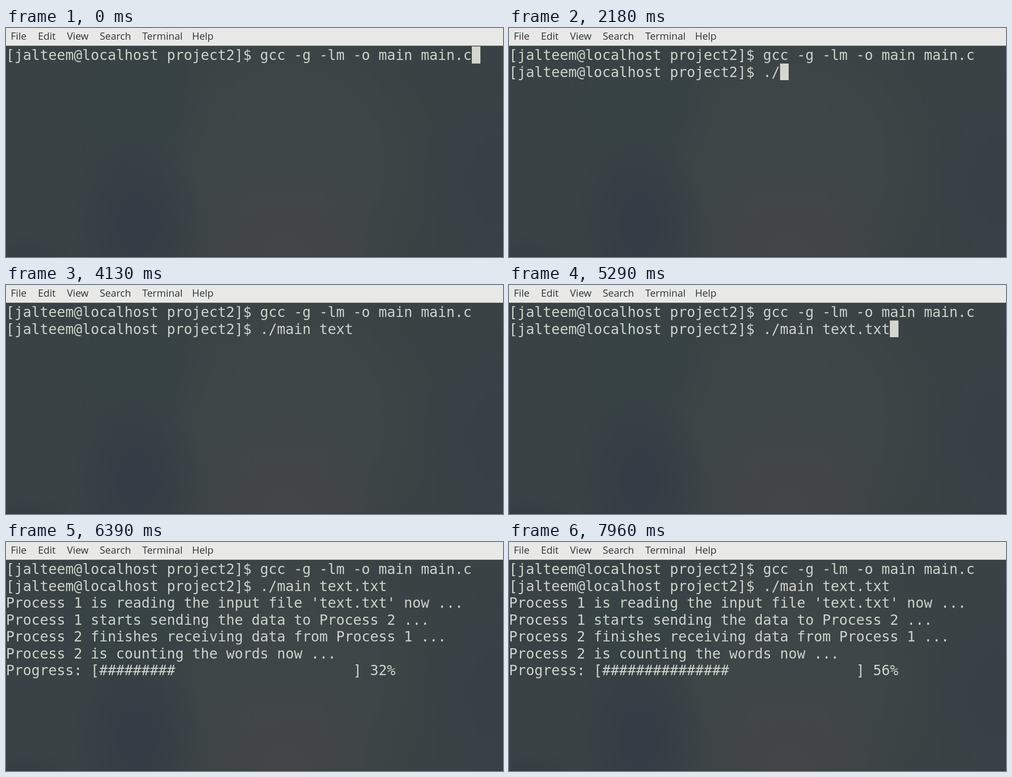
Animation, 1100 px wide and 509 px high, one loop 8000 ms. Source, as an HTML page with a canvas:

```html
<!DOCTYPE html>
<html lang="en">
<head>
<meta charset="utf-8">
<title>Terminal</title>
<style>
  html, body { margin: 0; width: 100%; height: 100%; overflow: hidden; }
  body {
    background:
      linear-gradient(#2d343a, #2d343a) 0 507.5px / 100% 2px no-repeat,
      radial-gradient(150px 210px at 290px 435px, #343d45 25%, #343d4500),
      radial-gradient(120px 60px at 40px 520px, #353d44, #353d4400),
      radial-gradient(180px 200px at 285px 165px, #374345 30%, #37434500),
      radial-gradient(180px 270px at 1090px 340px, #393f47 25%, #393f4700),
      radial-gradient(260px 220px at 620px 510px, #444546, #44454600),
      radial-gradient(370px 360px at 620px 300px, #3f4647 35%, #3f464700),
      #394244;
  }
  canvas { display: block; }
</style>
</head>
<body>
<canvas id="screen" width="1100" height="509"></canvas>
<script>
const ctx = document.getElementById('screen').getContext('2d');
const LOOP = 8000, CELL_W = 18.74, CELL_H = 37.48, TOP = 41.4;
const PROMPT = '[jalteem@localhost project2]$ ';
const COMPILE = PROMPT + 'gcc -g -lm -o main main.c';
const RUN = './main text.txt';
const OUTPUT = [
  "Process 1 is reading the input file 'text.txt' now ...",
  'Process 1 starts sending the data to Process 2 ...',
  'Process 2 finishes receiving data from Process 1 ...',
  'Process 2 is counting the words now ...'
];
const MENU = [['File', 10.5], ['Edit', 70.7], ['View', 135], ['Search', 207.5], ['Terminal', 301.5], ['Help', 411.7]];

// [time, characters of RUN visible]; "main " arrives by tab completion
const KEYS = [[2010, 1], [2180, 2], [2410, 3], [2560, 7], [3110, 8], [3190, 9], [3340, 10],
  [3490, 11], [4590, 12], [4990, 13], [5140, 14], [5290, 15]];
const CURSOR_OFF = [[1780, 2010], [4130, 4590], [6385, 7005], [7600, LOOP]];
const BURSTS = [[5840, 6620, 11], [6700, 7240, 8], [7410, 7960, 8]];
const PROGRESS = [[5840, 3], [6100, 20], [6390, 32], [7240, 47], [7960, 56]];

// Holds the screen between the refreshes of each output burst.
function refreshTime(t) {
  const burst = BURSTS.findLast(b => t >= b[0]);
  if (!burst) return t;
  const [start, end, count] = burst;
  const step = (end - start) / (count - 1);
  const i = Math.min(count - 1, Math.floor((t - start + 4) / step));
  return Math.round((start + i * step) / 10) * 10;
}

function percentAt(t) {
  const next = PROGRESS.findIndex(p => t < p[0]);
  if (next < 0) return PROGRESS.at(-1)[1];
  const [t0, p0] = PROGRESS[next - 1], [t1, p1] = PROGRESS[next];
  return Math.floor(p0 + (p1 - p0) * (t - t0) / (t1 - t0));
}

function linesAt(t) {
  if (t < 1160) return [COMPILE];
  if (t < 1240) return [COMPILE, ''];
  const key = KEYS.findLast(k => t >= k[0]);
  const lines = [COMPILE, PROMPT + RUN.slice(0, key ? key[1] : 0)];
  if (t < 5840) return lines;
  const percent = percentAt(t);
  const bar = '#'.repeat(3 * Math.floor(percent / 10)).padEnd(30);
  return [...lines, ...OUTPUT, `Progress: [${bar}] ${percent}%`];
}

function drawMenu() {
  ctx.fillStyle = '#e8e8e7';
  ctx.fillRect(0, 0, 1100, 39.4);
  ctx.fillStyle = '#2e3436';
  ctx.font = '22px "Open Sans", "Noto Sans", sans-serif';
  for (const [label, x] of MENU) ctx.fillText(label, x, 26);
}

function drawCursor(col, row) {
  const x = Math.round(col * CELL_W), y = Math.round(TOP + row * CELL_H);
  ctx.fillStyle = '#d3d7cf';
  ctx.fillRect(x, y, 19, Math.round(TOP + (row + 1) * CELL_H) - y);
}

function draw(t) {
  ctx.clearRect(0, 0, 1100, 509);
  drawMenu();
  const lines = linesAt(t);
  ctx.fillStyle = '#ced2ca';
  ctx.font = '31.1px "DejaVu Sans Mono", monospace';
  lines.forEach((line, row) => {
    for (let col = 0; col < line.length; col++) {
      ctx.fillText(line[col], col * CELL_W, TOP + row * CELL_H + 29.8);
    }
  });
  if (!CURSOR_OFF.some(([from, to]) => t >= from && t < to)) {
    drawCursor(lines.at(-1).length, lines.length - 1);
  }
}

const startTime = performance.now();
function frame() {
  draw(refreshTime((performance.now() - startTime) % LOOP));
  requestAnimationFrame(frame);
}
frame();
</script>
</body>
</html>
```
